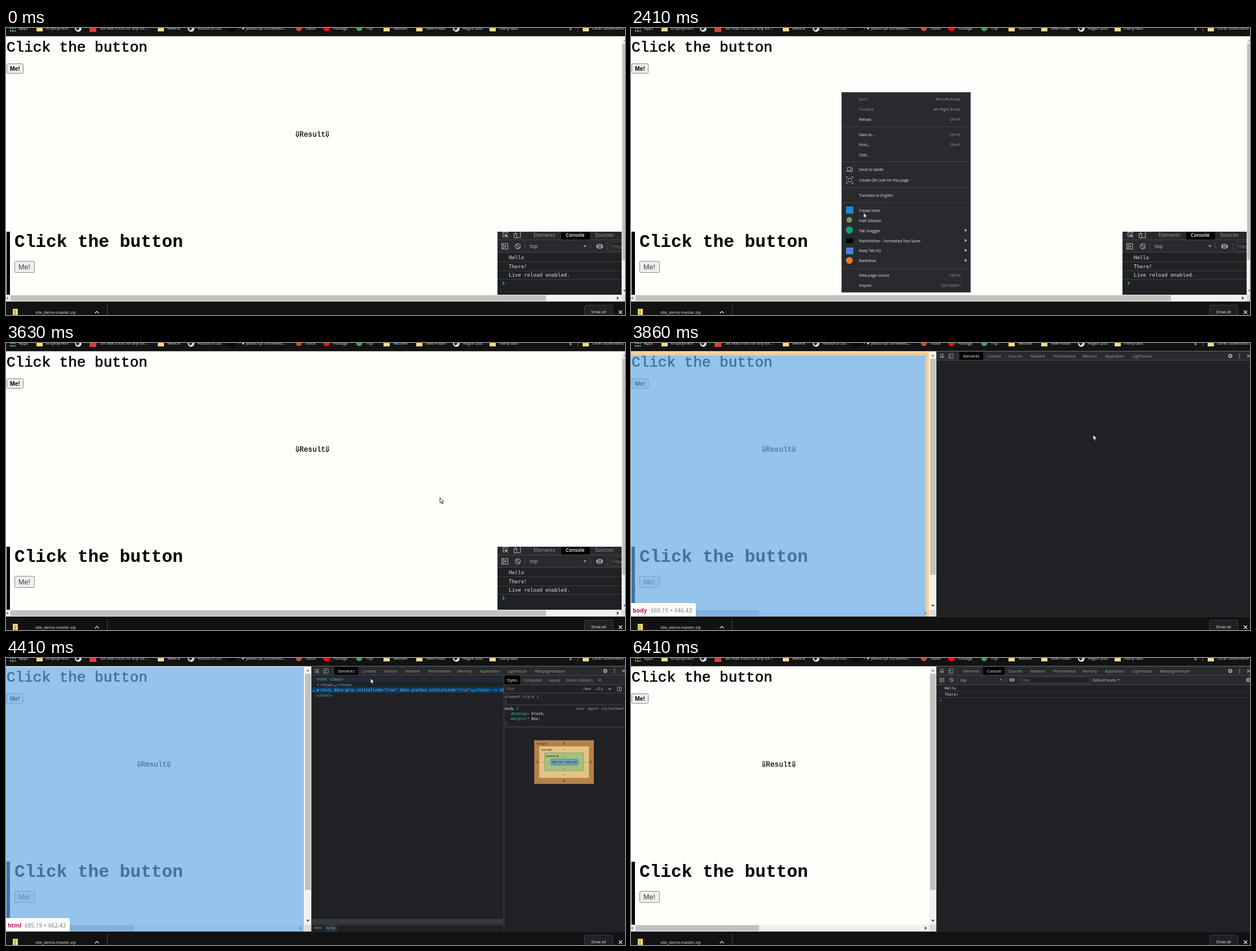
Write an HTML page with a canvas that moves like this. It is 1097 px wide and 510 px high and loops after 6500 ms.

```html
<!DOCTYPE html>
<html lang="en">
<head>
<meta charset="utf-8">
<title>Click the button</title>
<style>
html, body { margin: 0; width: 100%; height: 100%; overflow: hidden; background: #fefffa; }
canvas { display: block; }
</style>
</head>
<body>
<canvas id="stage" width="1097" height="510"></canvas>
<script>
const g = document.getElementById('stage').getContext('2d');
const LOOP = 6500;
const SANS = '"Open Sans", "Noto Sans", sans-serif';
const MONO = '"DejaVu Sans Mono", monospace';
const TYPE = '"Liberation Mono", monospace';
const ARIAL = '"Liberation Sans", Arial, sans-serif';
const UI = 6.65;
const PAGE = '#fefffa', PANEL = '#202124', BAR = '#292a2d', EDGE = '#47494d';
const LIGHT = '#e8eaed', GREY = '#9aa0a6', DARK = '#121212';

// Bursts of motion: start, end, number of steps
const BURSTS = [
  [210, 860, 9], [940, 1580, 9], [1720, 2330, 9], [2410, 3030, 9],
  [3160, 3770, 9], [3860, 4490, 9], [4560, 5180, 9], [5270, 5730, 7]
];
// Pointer tip: time, x, y
const PATH = [
  [210, 1037, 497], [860, 110, 107], [1420, 12, 72], [1720, 12, 72],
  [2170, 374, 114], [2254, 378, 126], [2330, 400, 188], [2410, 412, 328],
  [2640, 424, 440], [3030, 428, 462], [3160, 428, 462], [3617, 769, 275],
  [3860, 819, 163], [4100, 785, 92], [4411, 646, 36], [4560, 643, 25],
  [4870, 643, 23], [5180, 660, 72], [5653, 970, 476]
];

function box(x, y, w, h, color) {
  g.fillStyle = color;
  g.fillRect(x, y, w, h);
}

function frame(x, y, w, h, color, r = 0) {
  g.strokeStyle = color;
  g.lineWidth = 1;
  g.beginPath();
  g.roundRect(x + .5, y + .5, w - 1, h - 1, r);
  g.stroke();
}

function dot(x, y, r, color) {
  g.fillStyle = color;
  g.beginPath();
  g.arc(x, y, r, 0, 7);
  g.fill();
}

function ring(x, y, r, color, width = 1) {
  g.strokeStyle = color;
  g.lineWidth = width;
  g.beginPath();
  g.arc(x, y, r, 0, 7);
  g.stroke();
}

function line(points, color, width = 1) {
  g.strokeStyle = color;
  g.lineWidth = width;
  g.beginPath();
  for (let i = 0; i < points.length; i += 2) g.lineTo(points[i], points[i + 1]);
  g.stroke();
}

function poly(points, color) {
  g.fillStyle = color;
  g.beginPath();
  for (let i = 0; i < points.length; i += 2) g.lineTo(points[i], points[i + 1]);
  g.fill();
}

// y is the middle of the capitals
function text(s, x, y, size = UI, color = LIGHT, family = SANS, style = '', align = 'left') {
  g.font = `${style} ${size}px ${family}`;
  g.textAlign = align;
  g.fillStyle = color;
  g.fillText(s, x, y + size * .36);
}

// Typewriter text with a little extra weight, placed by its baseline
function typed(s, x, base, size, weight, style = '') {
  text(s, x, base - size * .36, size, '#000', TYPE, style);
  g.strokeStyle = '#000';
  g.lineWidth = weight;
  g.strokeText(s, x, base);
}

function code(parts, x, y, style = '') {
  for (const [s, color] of parts) {
    text(s, x, y, 6.69, color, MONO, style);
    x += g.measureText(s).width;
  }
}

// dir: 0 up, 1 right, 2 down, 3 left
function arrow(x, y, r, dir, color) {
  g.save();
  g.translate(x, y);
  g.rotate(dir * Math.PI / 2);
  poly([-r, r * .6, 0, -r * .6, r, r * .6], color);
  g.restore();
}

function folder(x, y) {
  box(x, y, 5, 3, '#e8c84c');
  box(x, y + 2, 11, 8, '#f7dd7c');
}

function globe(x, y) {
  dot(x, y, 5.8, '#f1f3f4');
  poly([x - 4, y - 2, x + 1, y - 1, x + 3, y + 1, x, y + 2, x - 1, y + 4, x - 4, y + 1], '#2a2c2f');
}

function inspectIcon(x, y, k = 1) {
  line([x + 3 * k, y - k, x + 3 * k, y - 3 * k, x - 3 * k, y - 3 * k, x - 3 * k, y + 3 * k, x - k, y + 3 * k], GREY, k * .9);
  poly([x - k, y - k, x + 4 * k, y + k, x + 2 * k, y + 1.7 * k, x + 4 * k, y + 3.5 * k, x + 3 * k, y + 4 * k, x + 1.2 * k, y + 2.5 * k, x, y + 4 * k], GREY);
}

function deviceIcon(x, y, k = 1) {
  g.strokeStyle = GREY;
  g.lineWidth = k * .9;
  g.strokeRect(x - 2 * k, y - 4 * k, 6 * k, 8 * k);
  box(x - 4.5 * k, y - k, 4 * k, 5.4 * k, BAR);
  g.strokeRect(x - 4 * k, y - k, 3.4 * k, 5 * k);
}

function playIcon(x, y, k = 1) {
  g.strokeStyle = GREY;
  g.lineWidth = k * .9;
  g.strokeRect(x - 3.5 * k, y - 3.2 * k, 7 * k, 6.4 * k);
  line([x - 1.7 * k, y - 3 * k, x - 1.7 * k, y + 3 * k], GREY, k * .8);
  arrow(x + k, y, 2 * k, 1, GREY);
}

function banIcon(x, y, k = 1) {
  ring(x, y, 3.2 * k, GREY, k);
  line([x - 2.2 * k, y - 2.2 * k, x + 2.2 * k, y + 2.2 * k], GREY, k);
}

function eyeIcon(x, y, k = 1) {
  g.fillStyle = GREY;
  g.beginPath();
  g.ellipse(x, y, 4.5 * k, 3 * k, 0, 0, 7);
  g.fill();
  dot(x, y, 1.9 * k, BAR);
  dot(x, y, k, GREY);
}

function gearIcon(x, y) {
  for (let i = 0; i < 8; i++) dot(x + 3.2 * Math.cos(i * .785), y + 3.2 * Math.sin(i * .785), .9, GREY);
  ring(x, y, 2.2, GREY, 1.8);
}

function bookmarks() {
  box(0, 0, 1097, 14, DARK);
  box(0, 14, 1097, 1, '#6b6b6a');
  for (let i = 0; i < 6; i++) {
    box(7 + i % 3 * 4, i < 3 ? 0 : 4, 2.5, i < 3 ? 1.5 : 2.5, ['#4db6ac', '#c0ca33', '#26a69a'][i % 3]);
  }
  for (const x of [54, 269, 669, 727, 857, 1022]) folder(x, -4);
  for (const x of [128, 328, 798]) globe(x, 1);
  box(148, -4, 12, 11, '#e23b33');
  box(393, -5, 12, 11, '#050505');
  dot(519, 0, 5.5, '#d94335');
  dot(568, 0, 6, '#f20d0d');
  dot(626, 0, 5.5, '#34a853');
  const labels = [
    ['Apps', 23], ['employment', 71], ['Six neat tricks for any sof...', 167], ['week-8', 286],
    ['Resource List', 340], ['• ★ JavaScript Unraveled...', 413], ['Inbox', 531], ['Footage', 580],
    ['Trip', 638], ['webdev', 687], ['New Folder', 744], ['Regex Quiz', 810], ['many-tabs', 874],
    ['Other bookmarks', 1039]
  ];
  for (const [s, x] of labels) text(s, x, .6, 6.8);
  text('»', 998, 1, 10);
  box(1013, 0, 1, 7, '#55575a');
}

function shelf() {
  box(0, 486, 1097, 24, DARK);
  box(0, 486, 1097, 1, '#2b2b2b');
  box(12, 499, 9, 11, '#f3d76a');
  box(15, 501, 2, 9, '#b59f4d');
  text('site_demo-master.zip', 52, 505, 7.2);
  line([157.5, 507, 161, 503.5, 164.5, 507], LIGHT, 1.2);
  box(179, 491, 1, 19, '#4a4a4a');
  g.fillStyle = '#202124';
  g.beginPath();
  g.roundRect(1025, 492, 51, 24, 3);
  g.fill();
  frame(1025, 492, 51, 24, '#3c3e42', 3);
  text('Show all', 1037, 505, 6.8);
  line([1086, 502, 1092, 508], LIGHT, 1.2);
  line([1092, 502, 1086, 508], LIGHT, 1.2);
}

function button(x, y, w, h, color) {
  g.fillStyle = '#efefed';
  g.beginPath();
  g.roundRect(x, y, w, h, 2);
  g.fill();
  frame(x, y, w, h, color, 2);
}

function downArrow(x) {
  line([x - 1.5, 183, x - 1.5, 191.5], '#000', 1.1);
  line([x + 1.5, 183, x + 1.5, 191.5], '#000', 1.1);
  line([x - 3, 189.5, x, 193.5, x + 3, 189.5], '#000', 1.1);
}

function miniConsole() {
  g.save();
  g.beginPath();
  g.rect(871, 362, 220, 112);
  g.clip();
  box(871, 362, 220, 112, PANEL);
  box(871, 362, 220, 36, BAR);
  box(984, 362, 51, 14, '#000');
  box(871, 376, 220, 1, EDGE);
  box(871, 398, 220, 1, EDGE);
  inspectIcon(885, 367, 1.4);
  deviceIcon(906, 367, 1.4);
  text('Elements', 935, 367.5, 8.9, GREY);
  text('Console', 992, 367.5, 8.7, '#fff', SANS, '600');
  text('Sources', 1044, 367.5, 8.9, GREY);
  playIcon(884, 388, 1.5);
  banIcon(907, 388, 1.4);
  for (const x of [919, 1035, 1066]) box(x, 381, 1, 14, EDGE);
  text('top', 928, 388, 9.2, '#bdc1c6');
  arrow(1026, 388, 3, 2, GREY);
  eyeIcon(1052, 388, 1.4);
  box(1072, 380, 30, 16, PANEL);
  frame(1072, 380, 30, 16, EDGE);
  text('Filter', 1075, 388.5, 9, '#80868b');
  ['Hello', 'There!', 'Live reload enabled.'].forEach((s, i) => {
    text(s, 891, 408 + i * 15.5, 9, '#dfe1e5', MONO);
    box(871, 415 + Math.round(i * 15.5), 220, 1, '#3c3f43');
  });
  line([880, 450.5, 883, 453.5, 880, 456.5], '#2bb3a3', 1.4);
  g.restore();
}

// w is the width of the page without its scrollbar
function page(w, thumb, barWidth) {
  box(0, 15, w + barWidth, 471, PAGE);
  g.save();
  g.beginPath();
  g.rect(0, 15, w, 471);
  g.clip();
  typed('Click the button', 1, 42, 26, .7);
  button(1, 63, 30, 18, '#858585');
  text('Me!', 7, 72.2, 10.4, '#000', ARIAL, 'bold');
  const mid = Math.floor(w / 2) - 2;
  downArrow(mid - 26.5);
  downArrow(mid + 26.5);
  typed('Result', mid - 23, 192.5, 12.8, .3);
  box(1, 362, 6, 112, '#000');
  typed('Click the button', 15, 388.5, 31.1, .1, 'bold');
  button(15, 414, 36, 21, '#8a8a8a');
  text('Me!', 22, 424.5, 12.6, '#3c3c3c', ARIAL);
  miniConsole();
  g.restore();

  box(0, 474, w, 12, '#f1f1f0');
  box(8, 475, thumb - 8, 10, '#c1c1c0');
  arrow(2, 480, 3, 3, '#8b8b8b');
  arrow(w - 6.5, 480, 3, 1, '#404040');
  box(w, 15, barWidth, 471, '#f1f1f0');
  box(w + 1, 28, 10, 384, '#c1c1c0');
  box(w, 474, barWidth, 12, '#dcdcdb');
  arrow(w + 6, 22, 3, 0, '#8b8b8b');
  arrow(w + 6, 467, 3, 2, '#404040');
}

const MENU = [
  ['Back', 127, 'Alt+Left Arrow'], ['Forward', 145, 'Alt+Right Arrow'], ['Reload', 163, 'Ctrl+R'],
  ['Save as...', 189.5, 'Ctrl+S'], ['Print...', 207.5, 'Ctrl+P'], ['Cast...', 225.5],
  ['Send to tablet', 252], ['Create QR code for this page', 270.5], ['Translate to English', 298],
  ['Create Note', 324.5], ['Path Gleaner', 342.5], ['Tab Snagger', 360.5],
  ['PlainFetcher - Formatted Text Saver', 378.5], ['Keep Tab XQ', 396], ['RankMole', 414],
  ['View page source', 440, 'Ctrl+U'], ['Inspect', 458, 'Ctrl+Shift+I']
];

function menu(hover) {
  box(373, 114, 229, 356, BAR);
  frame(373, 114, 229, 356, '#46484c');
  if (hover) box(374, hover - 9, 227, 18, '#3f4145');
  for (const y of [175, 237, 283, 310, 427]) box(374, y, 227, 1, '#404245');
  MENU.forEach(([s, y, key], i) => {
    text(s, 404, y, 6.65, i < 2 ? '#85878a' : LIGHT);
    if (key) text(key, 584, y, 6.65, GREY, SANS, '', 'right');
    if (i > 10 && i < 15) arrow(593.5, y - 1, 3, 1, '#c4c7ca');
  });
  frame(383, 247, 9, 7, GREY);
  box(381, 254, 8, 1, GREY);
  box(389, 249, 4, 7, BAR);
  frame(389, 249, 4, 7, GREY);
  frame(381, 264, 13, 13, GREY);
  box(385, 263, 5, 15, BAR);
  box(380, 268, 15, 5, BAR);
  frame(384, 267, 7, 7, GREY);
  box(381, 317, 13, 13, '#1b87d8');
  dot(387, 341, 5, '#6f9f63');
  dot(387, 359, 6.3, '#12a17c');
  box(381, 374, 13, 8, '#000');
  box(381, 390, 13, 12, '#4b83d6');
  dot(387, 413, 6, '#ef7b2a');
}

function toolTabs(selected, full) {
  const tabs = [
    ['Elements', 589], ['Console', 631], ['Sources', 669], ['Network', 707.5], ['Performance', 748],
    ['Memory', 800], ['Application', 840], ['Lighthouse', 889]
  ];
  if (full) tabs.push(['WebpagesKeeper', 937]);
  box(541, 15, 556, 471, PANEL);
  box(541, 15, 556, 16, BAR);
  box(541, 15, 1, 471, '#3a3c40');
  box(542, 30, 555, 1, EDGE);
  box(...(selected ? [624, 16, 38] : [582, 16, 42]), 14, '#000');
  inspectIcon(551, 23);
  deviceIcon(567, 23);
  box(578, 18, 1, 10, EDGE);
  tabs.forEach(([s, x], i) => text(s, x, 23.3, UI, i === selected ? '#fff' : GREY));
  gearIcon(1062, 23);
  for (const y of [20, 23, 26]) dot(1078.5, y, .9, GREY);
  line([1092, 20.5, 1097, 25.5], GREY, 1.1);
  line([1097, 20.5, 1092, 25.5], GREY, 1.1);
}

function tree(hoverHtml) {
  const tag = '#5db0d7', attr = '#9bbbdc', val = '#f29766';
  g.save();
  g.beginPath();
  g.rect(542, 31, 340, 455);
  g.clip();
  if (hoverHtml) box(542, 33, 340, 10, '#1d2a38');
  box(542, 52, 340, 10, '#073d69');
  code([['<html ', tag], ['class', attr], ['>', tag]], 550, 38);
  arrow(553, 47.5, 2, 1, GREY);
  code([['<head>', tag], ['…', LIGHT], ['</head>', tag]], 557, 47.5);
  text('…', 543, 56, 7, LIGHT);
  arrow(553, 57, 2, 1, LIGHT);
  code([
    ['<body ', tag], ['data-gclp-initialized', attr], ['="', tag], ['true', val], ['" ', tag],
    ['data-gistbox-initialized', attr], ['="', tag], ['true', val], ['">', tag], ['…', LIGHT],
    ['</body>', tag], [' == $0', GREY]
  ], 557, 57);
  code([['</html>', tag]], 550, 67);
  box(542, 464, 339, 8, '#38393a');
  box(542, 473, 340, 1, EDGE);
  box(564, 474, 24, 12, '#292b2f');
  text('html', 546, 480, UI, '#7cb3d4');
  text('body', 568, 480, UI, '#7cb3d4');
  g.restore();
}

function boxModel() {
  box(936, 146, 106, 78, '#b6814b');
  box(945, 157, 88, 56, '#e4c381');
  box(954, 168, 70, 33, '#a4c17f');
  box(965, 179, 49, 12, '#6fa3b8');
  g.setLineDash([2, 1]);
  frame(936, 146, 106, 78, '#8d633a');
  frame(954, 168, 70, 33, '#7b9560');
  g.setLineDash([]);
  frame(965, 179, 49, 12, '#5f8da0');
  const ink = '#222';
  text('margin', 940, 152, 6, ink);
  text('border', 949, 163, 6, ink);
  text('padding', 957, 174, 6, ink);
  const mid = (s, x, y, size = 6) => text(s, x, y, size, ink, SANS, '', 'center');
  mid('689.190 × 646.435', 989.5, 185, 5.3);
  for (const [x, y] of [[989, 152], [989, 218], [942, 185], [1036, 185]]) mid('8', x, y);
  for (const x of [951, 962, 1017, 1027]) mid('–', x, 185);
  for (const y of [163, 174, 196, 207]) mid('–', 989, y);
}

function styles() {
  box(882, 31, 1, 455, EDGE);
  box(883, 31, 214, 16, BAR);
  box(883, 31, 28, 16, '#000');
  text('Styles', 888, 39.3, UI, '#fff');
  [['Computed', 917], ['Layout', 961.5], ['Event Listeners', 993]].forEach(([s, x]) => text(s, x, 39.3, UI, GREY));
  text('»', 1050, 38.5, 10, GREY);
  for (const y of [47, 62, 83, 122]) box(883, y, 214, 1, EDGE);
  text('Filter', 886, 55, UI, '#80868b');
  code([[':hov', '#c4c7ca']], 1021, 55);
  code([['.cls', '#c4c7ca']], 1042, 55);
  line([1067, 55, 1073, 55], GREY);
  line([1070, 52, 1070, 58], GREY);
  frame(1083, 51, 8, 8, GREY);
  arrow(1087, 55, 2, 3, GREY);
  code([['element.style {', GREY]], 884, 68.5);
  code([['}', GREY]], 884, 78);
  code([['body', LIGHT], [' {', GREY]], 884, 90, 'italic');
  text('user agent stylesheet', 1095, 90, 6.69, GREY, MONO, 'italic', 'right');
  code([['display', '#35d4c7'], [': block;', LIGHT]], 895, 99, 'italic');
  code([['margin', '#35d4c7'], [':', LIGHT]], 895, 107.5, 'italic');
  arrow(926, 107, 1.8, 1, GREY);
  code([['8px;', LIGHT]], 931, 107.5, 'italic');
  code([['}', GREY]], 884, 116);
  boxModel();
}

function consolePane(caret) {
  box(542, 31, 555, 16, BAR);
  box(542, 47, 555, 1, EDGE);
  playIcon(551, 39);
  banIcon(568, 39);
  box(578, 34, 1, 10, EDGE);
  text('top', 584, 39.3, UI, '#bdc1c6');
  arrow(656, 39, 2.2, 2, GREY);
  box(664, 34, 1, 10, EDGE);
  eyeIcon(675, 39);
  box(689, 33, 124, 12, PANEL);
  frame(689, 33, 124, 12, EDGE);
  text('Filter', 692, 39.5, UI, '#80868b');
  text('Default levels', 818, 39.3, UI, '#bdc1c6');
  arrow(864, 39, 2.2, 2, GREY);
  gearIcon(1094, 39);
  code([['Hello', '#dfe1e5']], 556, 54);
  code([['There!', '#dfe1e5']], 556, 65);
  box(542, 59, 555, 1, '#35373b');
  box(542, 70, 555, 1, '#35373b');
  line([547.5, 73.8, 550, 76, 547.5, 78.2], '#5a8fd8', 1);
  if (caret) box(556, 72, 1, 8, '#e8eaed');
}

function highlight(name, size, margin) {
  const blue = 'rgba(100,168,230,.68)', orange = 'rgba(250,180,107,.68)';
  if (margin) {
    box(0, 16, 528, 6, orange);
    box(0, 22, 1, 464, orange);
    box(522, 22, 6, 464, orange);
    box(1, 22, 521, 464, blue);
  } else {
    box(0, 16, 528, 470, blue);
  }
  const w = margin ? 115 : 113;
  g.save();
  g.shadowColor = 'rgba(0,0,0,.25)';
  g.shadowBlur = 2;
  g.fillStyle = '#fff';
  g.beginPath();
  g.roundRect(-4, 462, w + 4, 24, 3);
  g.fill();
  g.restore();
  text(name, 3, 475, 10.3, '#c2105f', SANS, 'bold');
  text(size, margin ? 35 : 33, 475, 9.95, '#767676');
}

function pointer(x, y) {
  g.save();
  g.translate(x, y);
  g.beginPath();
  for (const [px, py] of [[0, 0], [0, 9.5], [2.2, 7.6], [3.8, 11.3], [5.3, 10.6], [3.8, 7], [6.7, 6.8]]) g.lineTo(px, py);
  g.closePath();
  g.fillStyle = '#fff';
  g.strokeStyle = '#111';
  g.lineWidth = .9;
  g.fill();
  g.stroke();
  g.restore();
}

// Holds the picture between the steps of each burst
function snap(t) {
  let held = 0;
  for (const [start, end, steps] of BURSTS) {
    if (t < start) break;
    const gap = (end - start) / (steps - 1);
    held = start + gap * Math.min(steps - 1, Math.floor((t - start + 12) / gap));
  }
  return held;
}

function pointerAt(t) {
  const i = PATH.findIndex(p => p[0] > t);
  if (i < 1) return PATH[PATH.length - 1].slice(1);
  const [t0, x0, y0] = PATH[i - 1], [t1, x1, y1] = PATH[i];
  const k = (t - t0) / (t1 - t0);
  return [x0 + (x1 - x0) * k, y0 + (y1 - y0) * k];
}

function draw(now) {
  const raw = now % LOOP, t = snap(raw);
  const tools = t > 3760;
  if (tools) {
    page(529, 227, 12);
    const inConsole = t > 4700;
    toolTabs(inConsole ? 1 : 0, t > 4000);
    if (inConsole) {
      consolePane(Math.floor((raw - 4820) / 530) % 2 === 0);
    } else if (t > 4000) {
      tree(t > 4380 && t < 4550);
      styles();
    }
    if (t > 3850 && t < 4380) highlight('body', '669.19 × 646.43', true);
    else if (t >= 4380 && t < 4550) highlight('html', '685.19 × 662.43', false);
  } else {
    page(1091, 957, 6);
  }
  bookmarks();
  shelf();
  if (t > 2170 && t < 3150) menu(t > 2320 && t < 2400 ? 189.5 : t > 2700 ? 458 : 0);
  if (t > 1400 && t < 1570) dot(13.5, 76, 6.5, 'rgba(255,236,0,.72)');
  if (t >= 210 && t < 5700) pointer(...pointerAt(t));
}

function tick() {
  draw(performance.now());
  requestAnimationFrame(tick);
}
tick();
</script>
</body>
</html>
```
